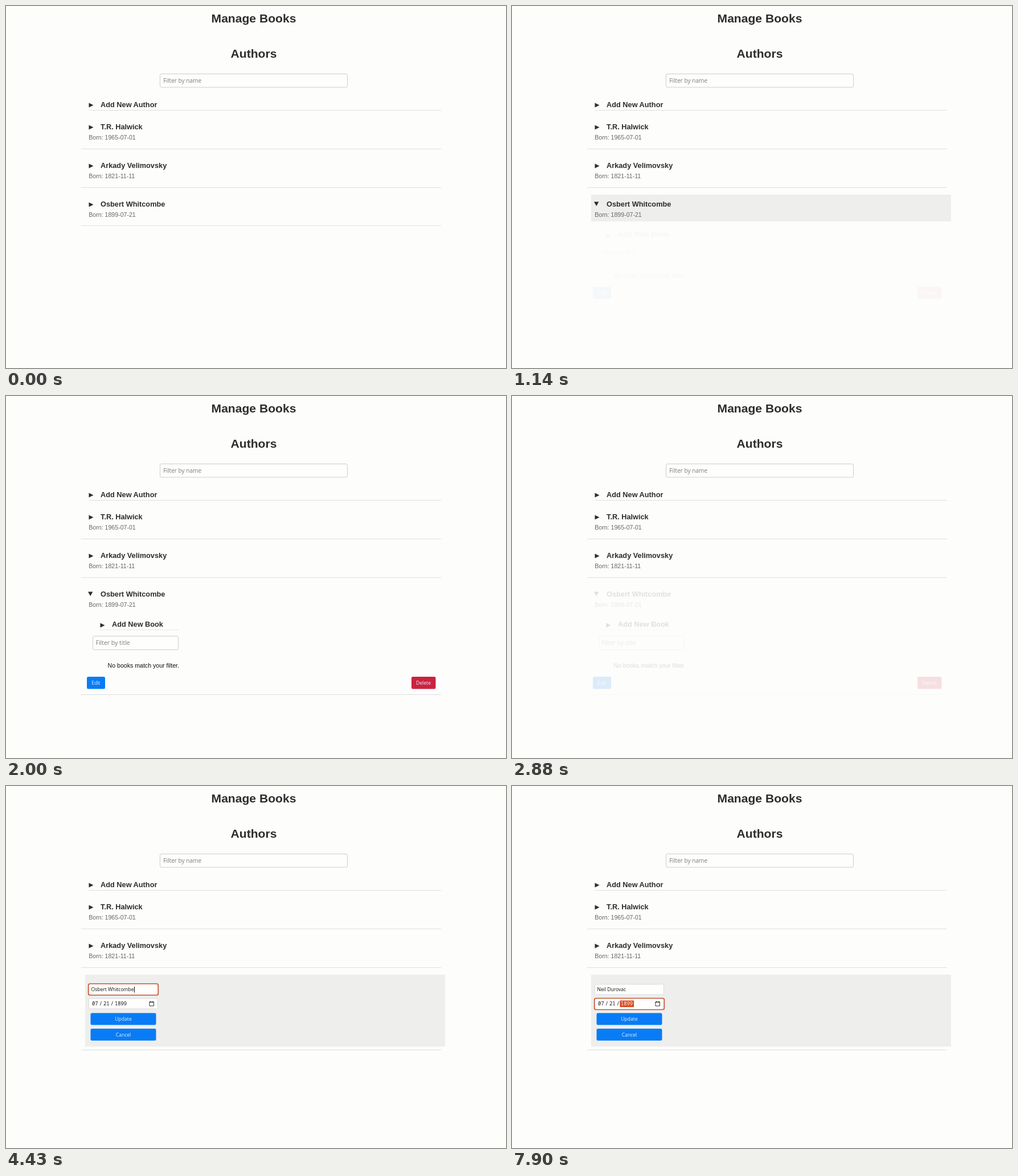
Animation, 878 px wide and 637 px high, one loop 8000 ms. Source, as an HTML page:

```html
<!DOCTYPE html>
<html lang="en">
<head>
<meta charset="utf-8">
<title>Manage Books</title>
<style>
html, body { margin: 0; width: 100%; height: 100%; overflow: hidden; background: #fdfdfb; }
svg { display: block; width: 878px; height: 637px; }
text { font: 10.6px "Liberation Sans", Arial, sans-serif; fill: #666; white-space: pre; }
.h1 { font-size: 21.1px; font-weight: bold; fill: #2d2d2d; text-anchor: middle; }
.h2 { font-size: 12.75px; font-weight: bold; fill: #2d2d2d; }
.hint { font: 10.1px "Open Sans", sans-serif; fill: #7b7b74; }
.btn { font: 8.6px "Open Sans", sans-serif; fill: #e4f0ff; text-anchor: middle; }
.val { font: 8.55px "Open Sans", sans-serif; fill: #111; }
.date { font: 8.8px "Noto Sans Mono", monospace; fill: #111; }
.line { stroke: #dfdfe3; }
.box { fill: #fefefd; stroke: #cdcdcb; }
.blue { fill: #087cf6; }
.tri { fill: #2d2d2d; }
.hover { fill: #eeeeec; }
.pick { fill: #d9491f; }
.ring { fill: #fefefd; stroke: #c5532f; stroke-width: 1.7; }
</style>
</head>
<body>
<svg viewBox="0 0 878 637">
  <defs><path id="closed" class="tri" d="M0-4 8 0 0 4z"/></defs>

  <text class="h1" x="435" y="29">Manage Books</text>
  <text class="h1" x="435" y="91">Authors</text>
  <rect class="box" x="270.5" y="119.5" width="329" height="23.5" rx="2.5"/>
  <text class="hint" x="276.3" y="135">Filter by name</text>

  <use href="#closed" x="145.5" y="174.5"/>
  <text class="h2" x="166" y="178">Add New Author</text>
  <path class="line" d="M145.5 183.5H764"/>

  <use href="#closed" x="145.5" y="213.5"/>
  <text class="h2" x="166" y="217">T.R. Halwick</text>
  <text x="145.3" y="235">Born: 1965-07-01</text>
  <path class="line" d="M132 251.5H764"/>

  <use href="#closed" x="145.5" y="281.5"/>
  <text class="h2" x="166" y="284.5">Arkady Velimovsky</text>
  <text x="145.3" y="303">Born: 1821-11-11</text>
  <path class="line" d="M132 319.5H764"/>

  <rect id="cardHover" class="hover" x="139" y="332" width="632" height="47"/>

  <g id="card">
    <use id="shut" href="#closed" x="145.5" y="349.5"/>
    <path id="open" class="tri" d="M144 344.5h8.4l-4.2 7.6z"/>
    <text class="h2" x="166" y="352.5">Osbert Whitcombe</text>
    <text x="145.3" y="370.5">Born: 1899-07-21</text>
  </g>
  <path id="shutLine" class="line" d="M132 386.5H764"/>

  <g id="books">
    <rect id="bookHover" class="hover" x="165" y="391" width="137" height="20.5"/>
    <use href="#closed" x="165.5" y="403.5"/>
    <text class="h2" x="186" y="406">Add New Book</text>
    <path class="line" d="M165 411.5H302" stroke-dasharray="2 1"/>
    <rect class="box" x="152.5" y="422.5" width="150" height="24" rx="2.5"/>
    <text class="hint" x="157.5" y="438" style="font-size:10.5px">Filter by title</text>
    <text x="178.5" y="478" style="fill:#111">No books match your filter.</text>
    <rect class="blue" x="142" y="494" width="32" height="21.5" rx="2.5"/>
    <text class="btn" x="158" y="508">Edit</text>
    <rect x="712" y="494" width="42.5" height="21.5" rx="2.5" fill="#cb2240"/>
    <text class="btn" x="733" y="508">Delete</text>
    <path class="line" d="M132 525.5H764"/>
  </g>

  <g id="form">
    <rect class="box" x="145.5" y="349" width="121" height="18" rx="1" style="stroke:#ddd"/>
    <rect id="nameRing" class="ring" x="144.7" y="348" width="122.6" height="20" rx="3"/>
    <rect id="pick" class="pick" x="149.5" y="353" height="11"/>
    <text id="name" class="val" x="149.5" y="361"></text>
    <path id="caret" stroke="#111" d="M0 353v10.5"/>

    <rect class="box" x="145.5" y="374" width="121" height="18" rx="1" style="stroke:#ddd"/>
    <rect id="dateRing" class="ring" x="144.7" y="373.5" width="122.6" height="20" rx="3"/>
    <rect id="yearPick" class="pick" x="189.5" y="377.5" width="24.5" height="11.5"/>
    <text class="date" y="386"><tspan x="151">07</tspan><tspan x="163.8">/</tspan><tspan x="171">21</tspan><tspan x="183.8">/</tspan><tspan id="year" x="191">1899</tspan></text>
    <path d="M252 380h7.5v7H252zM251.5 380.5h8.5M253.5 378.5v2M258 378.5v2" fill="none" stroke="#333"/>

    <rect class="blue" x="148.5" y="399.5" width="115" height="21" rx="2.5"/>
    <text class="btn" x="206" y="413">Update</text>
    <rect class="blue" x="148.5" y="427" width="115" height="21" rx="2.5"/>
    <text class="btn" x="206" y="441">Cancel</text>
    <path class="line" d="M132 464.5H764"/>
  </g>
</svg>
<script>
const LOOP = 8000;
const el = id => document.getElementById(id);
const ramp = (t, a, b) => Math.min(1, Math.max(0, (t - a) / (b - a)));
const within = (t, a, b) => t >= a && t < b;
const fade = (id, v) => { el(id).style.opacity = +v; };

function draw(t) {
  const leave = 1 - ramp(t, 2690, 2910);
  const editing = t >= 3940;
  const naming = within(t, 4430, 7900);
  const selected = within(t, 5480, 6260);
  const dating = t >= 7900;

  fade("cardHover", within(t, 370, 2000) || editing);
  el("cardHover").setAttribute("height", editing ? 126.5 : 47);

  // The card opens, then gives way to the edit form.
  fade("card", leave);
  fade("shut", t < 720);
  fade("open", t >= 720);
  fade("shutLine", 1 - ramp(t, 720, 1120));
  fade("books", ramp(t, 1130, 1520) * leave);
  fade("bookHover", within(t, 2270, 2330));
  fade("form", ramp(t, 2910, 3130));

  const name = el("name");
  name.textContent = t < 6260 ? "Osbert Whitcombe" : "Neil Durovac";
  name.style.fill = selected ? "#fff" : "#111";
  const width = name.getComputedTextLength();
  el("pick").setAttribute("width", width);
  el("caret").setAttribute("transform", `translate(${Math.round(149.5 + width) + .5})`);
  fade("nameRing", naming);
  fade("pick", selected);
  fade("caret", naming && !selected && t < 7480);

  fade("dateRing", dating);
  fade("yearPick", dating);
  el("year").style.fill = dating ? "#fff" : "#111";
}

const start = performance.now();
function tick() {
  draw((performance.now() - start) % LOOP);
  requestAnimationFrame(tick);
}
tick();
</script>
</body>
</html>
```
